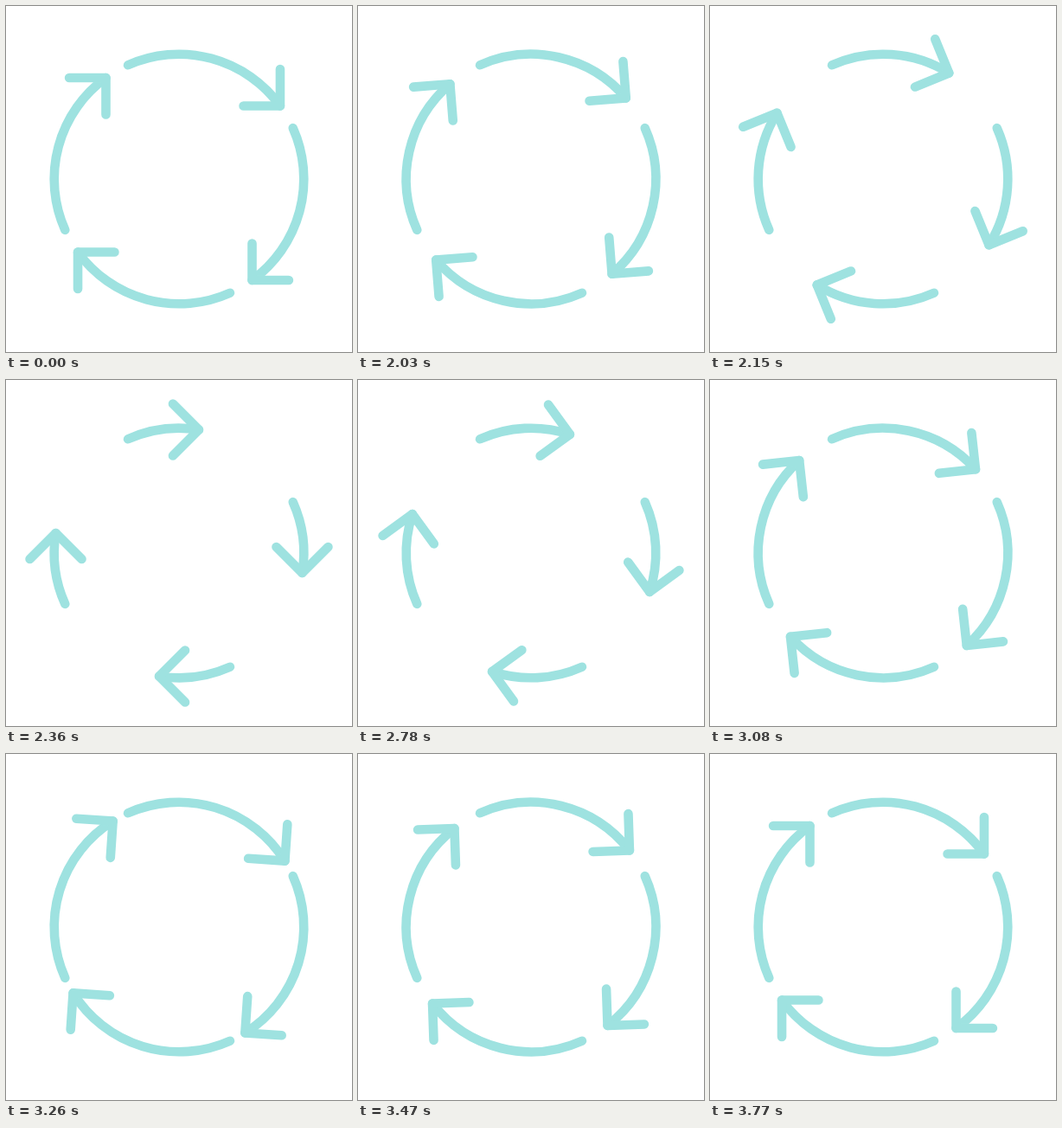
Recreate the animation shown at these times as an HTML page with a canvas. Size 400 by 400 pixels, loop 3.83 s.

```html
<!DOCTYPE html>
<html lang="en">
<head>
<meta charset="utf-8">
<title>Circling arrows</title>
<style>
  html, body { margin: 0; width: 100%; height: 100%; overflow: hidden; background: #fff; }
  canvas { display: block; width: 100vmin; height: 100vmin; }
</style>
</head>
<body>
<canvas id="stage" width="400" height="400"></canvas>
<script>
const ctx = document.getElementById("stage").getContext("2d");
const LOOP = 3830, START = 2030, END = 3770, STEP = 30;
const RAD = Math.PI / 180;
const RADIUS = 144.3, ARM = 42.4;
const TAIL = -24.1, TIP = 54.15; // degrees clockwise from the top

// Turn of the arrowheads in degrees: draw back, release, ring out.
function swing(t) {
  if (t < START || t >= END) return 0;
  const pull = 2002, release = 2718, pass = 2873, depth = 60;
  if (t < release) {
    const rest = 1 - (t - pull) / (release - pull);
    return -depth * (1 - rest * rest);
  }
  if (t < pass) return -depth * (pass - t) / (pass - release);
  const s = (t - pass) / 1000;
  return 20 * Math.sin(6 * Math.PI * s) * Math.exp(-3.8 * s);
}

function drawArrow(turn) {
  const tip = TIP + turn;
  ctx.beginPath();
  ctx.arc(0, 0, RADIUS, (TAIL - 90) * RAD, (tip - 90) * RAD);
  ctx.stroke();

  ctx.save();
  ctx.rotate(tip * RAD);
  ctx.translate(0, -RADIUS);
  ctx.rotate(-TIP * RAD);
  ctx.beginPath();
  ctx.moveTo(0, -ARM);
  ctx.lineTo(0, 0);
  ctx.lineTo(-ARM, 0);
  ctx.stroke();
  ctx.restore();
}

function draw(t) {
  const held = t < START ? 0 : START + Math.floor((t - START) / STEP) * STEP;
  const turn = swing(held);
  ctx.setTransform(1, 0, 0, 1, 0, 0);
  ctx.fillStyle = "#fff";
  ctx.fillRect(0, 0, 400, 400);
  ctx.translate(200, 200);
  ctx.strokeStyle = "#9ee2e0";
  ctx.lineWidth = 10.6;
  ctx.lineCap = ctx.lineJoin = "round";
  for (let i = 0; i < 4; i++) {
    drawArrow(turn);
    ctx.rotate(Math.PI / 2);
  }
}

const begin = performance.now();
function tick() {
  draw((performance.now() - begin) % LOOP);
  requestAnimationFrame(tick);
}
tick();
</script>
</body>
</html>
```
